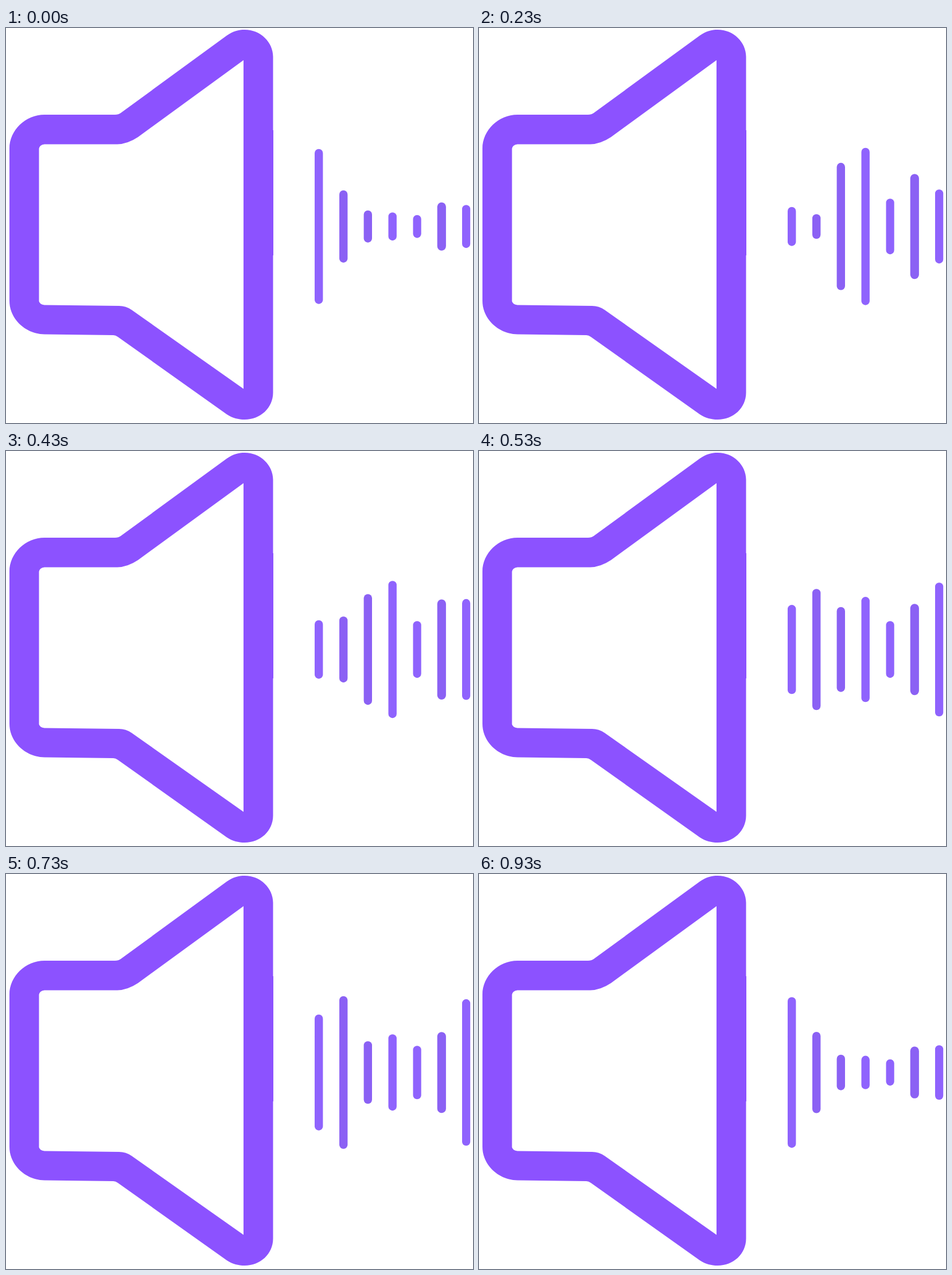
These frames come from a looping animation (814 px wide and 688 px high, 1010 ms). An HTML page:

```html
<!DOCTYPE html>
<html lang="en">
<head>
<meta charset="utf-8">
<title>Speaker</title>
<style>
  html, body { margin: 0; width: 100%; height: 100%; overflow: hidden; background: #fff; }
  svg { display: block; width: 100vw; height: 100vh; }
</style>
</head>
<body>
<svg id="stage" viewBox="0 0 814 688" xmlns="http://www.w3.org/2000/svg">
  <path fill="#8c52ff" fill-rule="evenodd" d="
    M6 210 C6 178 34 151 67 151 H190 Q196 151 200 148
    L385 13 C396 5.500 405 3 416 3 C444 3 465.500 25 465.500 50
    V178 H466 V396 H465.500 V635
    C465.500 662 443 682 416 682 C405 682 395 679.500 385 673
    L195 538 Q191 535 187 535 L67 533.500 C34 533 6 507 6 475 Z
    M57.500 210 Q59 203 67 202.500 H194 Q212 202 230 190
    L414 56 V628.500 L219 491 Q209 484 197 484 L67 482.500 Q59 481.500 57.500 476 Z"/>
</svg>
<script>
const LOOP = 1010, MID = 345.7;

// Bar centre, width, fill, and height in each of the three poses
const bars = [
  [545.2, 14.4, '#8f63fd', 270, 60.5, 194.4],
  [588.2, 14.4, '#8b61f4', 126, 40, 281.7],
  [630.8, 14.4, '#8b61f4', 56, 228, 115],
  [673.7, 14.4, '#8f63fd', 49, 282.3, 142.4],
  [716.6, 14.2, '#8f63fd', 40, 99, 99],
  [759.3, 15.2, '#8b61f4', 84, 186.7, 147.4],
  [802.1, 14.2, '#8f63fd', 75, 131, 275.2]
];

// Time in ms against pose position; 3 is pose 0 again
const track = [
  [0, 0], [100, 0.626], [230, 0.964], [292, 1], [430, 1.31],
  [530, 1.708], [669, 2], [730, 2.1], [930, 2.9], [1010, 3]
];

const gaps = track.slice(1).map((p, i) => p[0] - track[i][0]);
const rates = track.slice(1).map((p, i) => (p[1] - track[i][1]) / gaps[i]);

// Monotone cubic tangents
const slopes = track.map((p, i) => {
  if (i === 0) return rates[0] * 1.25;
  if (i === rates.length) return rates[i - 1] * 0.6;
  const a = 2 * gaps[i] + gaps[i - 1], b = gaps[i] + 2 * gaps[i - 1];
  return (a + b) / (a / rates[i - 1] + b / rates[i]);
});

function position(t) {
  let i = 0;
  while (i < gaps.length - 1 && t >= track[i + 1][0]) i++;
  const h = gaps[i], x = (t - track[i][0]) / h, y = 1 - x;
  return track[i][1] * (1 + 2 * x) * y * y + slopes[i] * h * x * y * y +
    track[i + 1][1] * x * x * (3 - 2 * x) - slopes[i + 1] * h * x * x * y;
}

// Alternating holds of 30 and 70 ms
function hold(t) {
  const base = Math.floor(t / 100) * 100;
  return Math.min(930, t - base >= 30 ? base + 30 : base);
}

const stage = document.getElementById('stage');
const rects = bars.map(([x, w, fill]) => {
  const r = document.createElementNS(stage.namespaceURI, 'rect');
  const attrs = { x: x - w / 2, width: w, rx: w / 2, ry: w / 2, fill };
  for (const k in attrs) r.setAttribute(k, attrs[k]);
  return stage.appendChild(r);
});

function draw(t) {
  const p = position(hold(t));
  const from = Math.min(2, Math.floor(p)), mix = p - from;
  bars.forEach((bar, i) => {
    const a = bar[3 + from], b = bar[3 + (from + 1) % 3];
    const h = a + (b - a) * mix;
    rects[i].setAttribute('y', MID - h / 2);
    rects[i].setAttribute('height', h);
  });
}

const start = performance.now();
function tick() {
  draw((performance.now() - start) % LOOP);
  requestAnimationFrame(tick);
}
draw(0);
requestAnimationFrame(tick);
</script>
</body>
</html>
```
